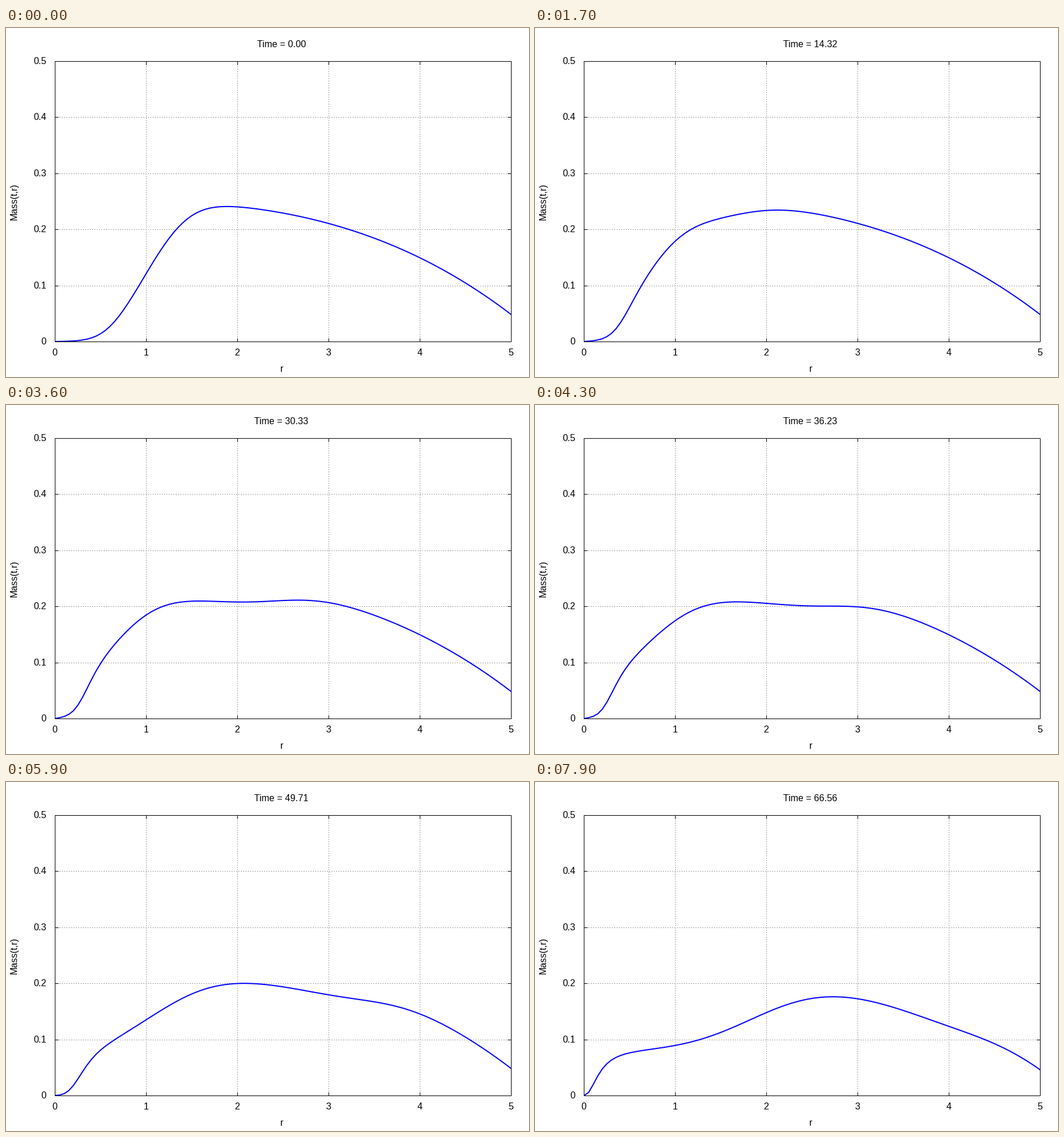
A matplotlib script for the animation above (8000 ms loop, 900 by 600 pixels).

```python
import math

import numpy as np
import matplotlib.pyplot as plt
from matplotlib.animation import FuncAnimation

W, H, DPI = 900, 600, 100
PX = 72 / DPI                      # one pixel in points
LEFT, RIGHT, TOP, BOTTOM = 84, 869, 57, 539
FRAMES, STEP_MS, DT = 80, 100, 0.84254

TOTAL, CORE = 0.2555, 0.083        # whole mass and the part kept by the core
r = np.linspace(0, 5, 101)
normal_cdf = np.vectorize(lambda z: (1 + math.erf(z / math.sqrt(2))) / 2)


def shell(center, width):
    """Share of a Gaussian shell inside each radius, zero at the origin."""
    start = normal_cdf(-center / width)
    return (normal_cdf((r - center) / width) - start) / (1 - start)


def core(radius, power):
    return r**power / (r**power + radius**power)


def smoothstep(u):
    u = min(max(u, 0), 1)
    return u * u * (3 - 2 * u)


def mass(step):
    """A shrinking core, a shell that bounces and a shell that escapes."""
    escaping = 0.043 - 0.00013 * step
    radius = np.interp(step, [0, 17, 28, 43, 51, 67, 79],
                       [.85, .53, .43, .345, .3, .355, .175])
    bounce = shell(0.68 + 0.000508 * (step - 30)**2,
                   0.32 + 0.3 * smoothstep((step - 20) / 59))
    escape = shell(0.95 + 0.043 * step, 0.37 + 0.0008 * step)
    return (CORE * core(radius, 4.6 - 0.0004 * step**2)
            + (TOTAL - CORE - escaping) * bounce
            + escaping * escape
            - 0.00166 * r**3).clip(0)


plt.rcParams["font.family"] = "Liberation Sans"
fig = plt.figure(figsize=(W / DPI, H / DPI), dpi=DPI, facecolor="white")
ax = fig.add_axes([0, 0, 1, 1])
ax.set(xlim=(0, W), ylim=(H, 0))
ax.axis("off")


def line(xs, ys, color="black", width=1, **kw):
    return ax.plot(xs, ys, color=color, lw=width * PX, **kw)[0]


def label(x, y, s, ha="center", **kw):
    return ax.text(x, y, s, ha=ha, va="baseline", fontsize=16 * PX,
                   color="black", **kw)


grid = dict(color="#a0a0a0", linestyle=(0.5, (2, 2)), dash_capstyle="butt",
            zorder=1)
tick = dict(zorder=3, solid_capstyle="butt")

# straight lines snap to the pixel that starts at their coordinate
for i in range(6):
    x = round(LEFT + i * (RIGHT - LEFT) / 5)
    y = round(BOTTOM - i * (BOTTOM - TOP) / 5)
    if 0 < i < 5:
        line([x, x], [BOTTOM, TOP], **grid)
        line([LEFT, RIGHT], [y, y], **grid)
        line([x, x], [BOTTOM, BOTTOM - 6], **tick)
        line([x, x], [TOP, TOP + 6], **tick)
        line([LEFT, LEFT + 6], [y, y], **tick)
        line([RIGHT, RIGHT - 6], [y, y], **tick)
    label(x, 563, str(i))
    label(69.5, y + 5, f"{i / 10:g}", ha="right")

line([LEFT, RIGHT, RIGHT, LEFT, LEFT], [TOP, TOP, BOTTOM, BOTTOM, TOP],
     zorder=3, solid_joinstyle="miter", solid_capstyle="projecting")
label(474.5, 591, "r")
label(19, 298, "Mass(t,r)", rotation=90, rotation_mode="anchor")
title = label(473.8, 33, "")
curve = line(LEFT + .5 + r * (RIGHT - LEFT) / 5, r, "#0000ff", 2, zorder=2,
             solid_joinstyle="round", solid_capstyle="butt")


def update(step):
    curve.set_ydata(BOTTOM - mass(step) * (BOTTOM - TOP) / 0.5)
    title.set_text(f"Time = {step * DT:.2f}")
    return curve, title


anim = FuncAnimation(fig, update, frames=FRAMES, interval=STEP_MS,
                     repeat=True, repeat_delay=0)
plt.show()
```
